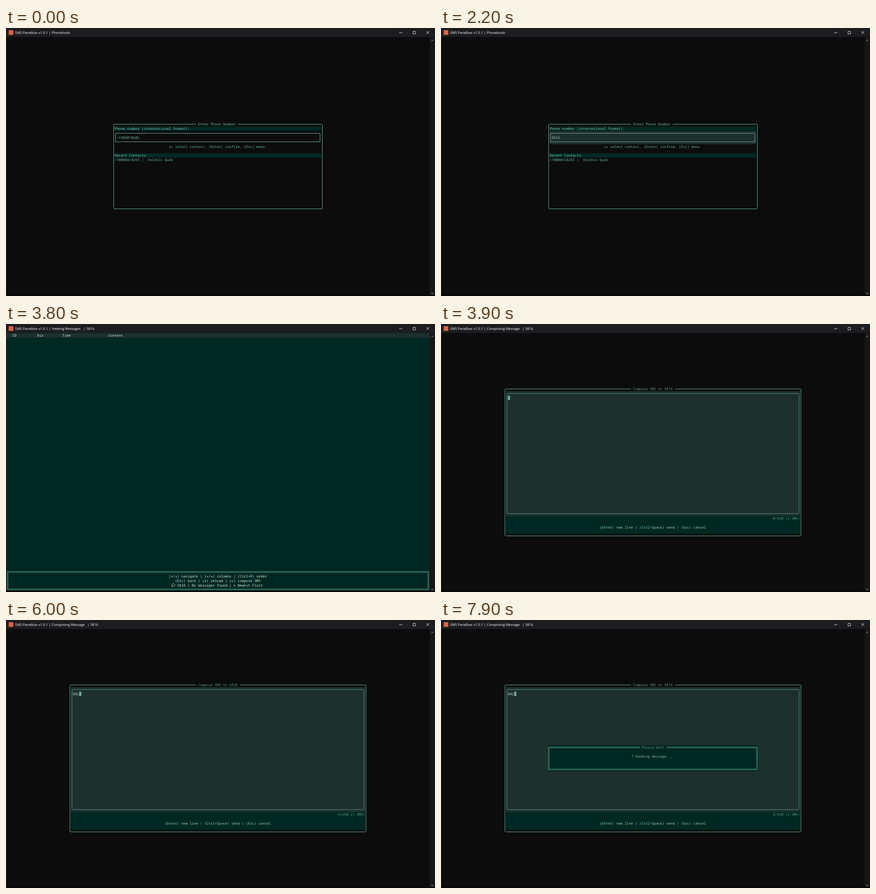
Write an HTML page that moves like this. It is 946x592 px and loops after 8 s.

```html
<!DOCTYPE html>
<html lang="en">
<head>
<meta charset="utf-8">
<title>SMS Panelbox</title>
<style>
  html, body { margin: 0; width: 100%; height: 100%; overflow: hidden; background: #0c0c0c; }
  svg { display: block; }
  text { white-space: pre; text-rendering: geometricPrecision; }
  .cell { font: 7.67px "Noto Sans Mono", "DejaVu Sans Mono", monospace; }
  .arrow { font: bold 7.65px "DejaVu Sans Mono", monospace; }
  .bar { font: 7.55px "Open Sans", "Noto Sans", sans-serif; fill: #fff; }
</style>
</head>
<body>
<svg id="stage" width="946" height="592" viewBox="0 0 946 592"></svg>
<script>
const LOOP = 8000;
const CELL_W = 4.604, CELL_H = 9.85, TOP = 20.5;
const DARK = '#002822', PANEL = '#1e302e';
const LINE = '#62b59a', SOFT = '#6fa598', DIM = '#559683', THICK = '#4c8d79';
const LABEL = '#85c8b2', HINT = '#66b098', PALE = '#dbe5e2';
const NUMBER = '5816', MESSAGE = 'BAL';

const stage = document.getElementById('stage');

function add(parent, tag, attrs, content) {
  const node = document.createElementNS('http://www.w3.org/2000/svg', tag);
  for (const key in attrs) node.setAttribute(key, attrs[key]);
  if (content !== undefined) node.textContent = content;
  return parent.appendChild(node);
}

const group = parent => add(parent, 'g', {});
const fill = (g, x, y, x2, y2, color) =>
  add(g, 'rect', { x, y, width: x2 - x, height: y2 - y, fill: color });
const stroke = (g, d, color, width = 1) =>
  add(g, 'path', { d, fill: 'none', stroke: color, 'stroke-width': width });
const barText = (g, x, s) => add(g, 'text', { x, y: 13, class: 'bar' }, s);
const show = (node, on) => node.setAttribute('visibility', on ? 'inherit' : 'hidden');

// Terminal text placed by column and row; arrows use a heavier face
function print(g, col, row, s, color) {
  const y = TOP + (row + 0.5) * CELL_H + 2.75;
  const node = add(g, 'text', { x: col * CELL_W, y, class: 'cell', fill: color });
  for (const part of s.split(/([←↑→↓]+)/)) {
    add(node, 'tspan', /[←↑→↓]/.test(part) ? { class: 'arrow' } : {}, part);
  }
  return node;
}

// Frame with an optional break in the top edge for a title
function frame(g, x, y, x2, y2, color, r = 2, gap) {
  const [a, b] = gap || [x + r, x + r];
  const corner = (dx, dy) => r ? `a${r} ${r} 0 0 1 ${dx} ${dy}` : '';
  stroke(g, `M${b} ${y}H${x2 - r}${corner(r, r)}V${y2 - r}${corner(-r, r)}` +
    `H${x + r}${corner(-r, -r)}V${y + r}${corner(r, -r)}H${a}`, color);
}

function doubleFrame(g, x, y, x2, y2, color, gap) {
  const d = 1.8;
  frame(g, x, y, x2, y2, color, 0, gap);
  frame(g, x + d, y + d, x2 - d, y2 - d, color, 0, gap);
}

function titleParts(g, view, barX, numberX) {
  barText(g, 101, view);
  if (!barX) return;
  barText(g, barX, '|');
  barText(g, numberX, NUMBER);
}

// Window
fill(stage, 0, 0, 946, 592, '#0c0c0c');
fill(stage, 0, 0, 946, 20, '#1c1c21');
fill(stage, 934, 20, 946, 592, '#171717');

// Phone number screen
const phone = group(stage);
titleParts(phone, 'Phonebook');
frame(phone, 237.5, 212.5, 697.5, 399.5, LINE, 2, [419, 511]);
print(phone, 92, 19, 'Enter Phone Number', LINE);
fill(phone, 239.5, 217.5, 695, 227.3, DARK);
print(phone, 52, 20, 'Phone number (international format):', LABEL);
const idle = group(phone), active = group(phone);
frame(idle, 241.5, 232.5, 692.5, 251.5, LINE, 0);
print(idle, 53, 22, '+1908070605', HINT);
fill(active, 239.5, 227.3, 695, 256.7, PANEL);
frame(active, 241.5, 232.5, 692.5, 251.5, SOFT, 0);
const digits = print(active, 53, 22, '', '#a9cfc4');
print(phone, 78, 24, '↑↓ select contact, (Enter) confirm, (Esc) menu', HINT);
fill(phone, 239.5, 276.6, 695, 286.4, DARK);
print(phone, 52, 26, 'Recent Contacts:', LABEL);
print(phone, 52, 27, '+70000418293 |  Veldrin Quob', LINE);

// Message list screen
const list = group(stage);
titleParts(list, 'Viewing Messages', 170.4, 177.5);
fill(list, 1, 20, 934, 588.5, DARK);
fill(list, 1, 20.5, 934, 30.3, PANEL);
[[3, 'ID'], [15, 'Dir'], [27, 'Time'], [49, 'Content']]
  .forEach(([col, s]) => print(list, col, 0, s, PALE));
doubleFrame(list, 2.7, 546.7, 932.3, 587.3, THICK);
print(list, 78, 54, '(↑/↓) navigate | (←/→) columns | (Ctrl+R) order', PALE);
print(list, 81, 55, '(Esc) back | (r) reload | (c) compose SMS', PALE);
print(list, 82, 56, NUMBER + ' | No messages found | ↑ Newest First', PALE);
stroke(list, 'M367 578.7C364.5 577.5 364.8 574 369 574S374 578.9 369 579L366.2 580.2Z', PALE, 0.8);

// Compose screen
const compose = group(stage);
titleParts(compose, 'Composing Message', 179.4, 186);
frame(compose, 141, 143.5, 793.8, 468, LINE, 2, [419, 516]);
print(compose, 92, 12, 'Compose SMS to ' + NUMBER, DIM);
fill(compose, 143, 148.5, 792, 463.6, DARK);
fill(compose, 143, 148.5, 792, 424, PANEL);
frame(compose, 145.5, 153.5, 789.5, 418.8, '#5b9484');
const typed = print(compose, 32, 14, '', '#c3d3ce');
const cursor = fill(compose, 0, 158.3, 4.7, 168, '#73a99c');
const counter = print(compose, 159, 41, '', '#659d8d');
print(compose, 76, 43, '(Enter) new line | (Ctrl+Space) send | (Esc) cancel', '#a5c6bc');

// Wait dialog
const dialog = group(compose);
fill(dialog, 235.5, 276.6, 699.5, 334, DARK);
doubleFrame(dialog, 236.7, 280.5, 697.7, 331, THICK, [438, 498]);
print(dialog, 96, 26, 'Please Wait', DIM);
print(dialog, 93, 28, 'Sending message...', '#7fb5a5');
// Braille cell: bits 0-2 left column, bits 3-5 right column
const dots = [0, 1, 2, 3, 4, 5].map(i => add(dialog, 'rect', {
  x: i < 3 ? 420.2 : 422.4, y: 298 + (i % 3) * 2.2, width: 1.2, height: 1.2, fill: '#8fc4b4'
}));
const SPIN = [0x0b, 0x19, 0x39, 0x38, 0x3c, 0x34, 0x26, 0x27, 0x07, 0x0f];

// Window controls and edges
add(stage, 'rect', { x: 5.8, y: 4.8, width: 10.4, height: 10.4, rx: 1, fill: '#d9623f' });
barText(stage, 20, 'SMS Panelbox v1.0.1');
barText(stage, 94.6, '|');
stroke(stage, 'M867 10.5H874M897.5 7.5H903V13H897.5ZM927 7L933 13M933 7L927 13', '#eee', 0.9);
add(stage, 'path', { d: 'M937 28.5L940 24.5L943 28.5ZM937 585L940 589L943 585Z', fill: '#5a5a5a' });
stroke(stage, 'M0.5 0V592', '#262626');
fill(stage, 0, 590.5, 946, 592, '#050505');

const DIGIT_TIMES = [1300, 1600, 2000, 2200];
const LETTER_TIMES = [4700, 4900, 5100];
const countAt = (times, t) => times.filter(at => t >= at).length;

function draw(t) {
  show(phone, t < 2900);
  show(list, t >= 2900 && t < 3900);
  show(compose, t >= 3900);

  const n = countAt(DIGIT_TIMES, t);
  show(idle, n === 0);
  show(active, n > 0);
  digits.textContent = NUMBER.slice(0, n);

  const m = countAt(LETTER_TIMES, t);
  typed.textContent = MESSAGE.slice(0, m);
  counter.textContent = m + '/160 (1 SMS)';
  cursor.setAttribute('x', (32 + m) * CELL_W + 0.2);
  show(cursor, t < 5300 || Math.floor((t - 5300) / 500) % 2 === 1);

  show(dialog, t >= 6800);
  const bits = SPIN[(Math.floor(t / 100) + 4) % 10];
  dots.forEach((dot, i) => show(dot, bits >> i & 1));
}

const start = performance.now();
function tick() {
  draw((performance.now() - start) % LOOP);
  requestAnimationFrame(tick);
}
tick();
</script>
</body>
</html>
```
